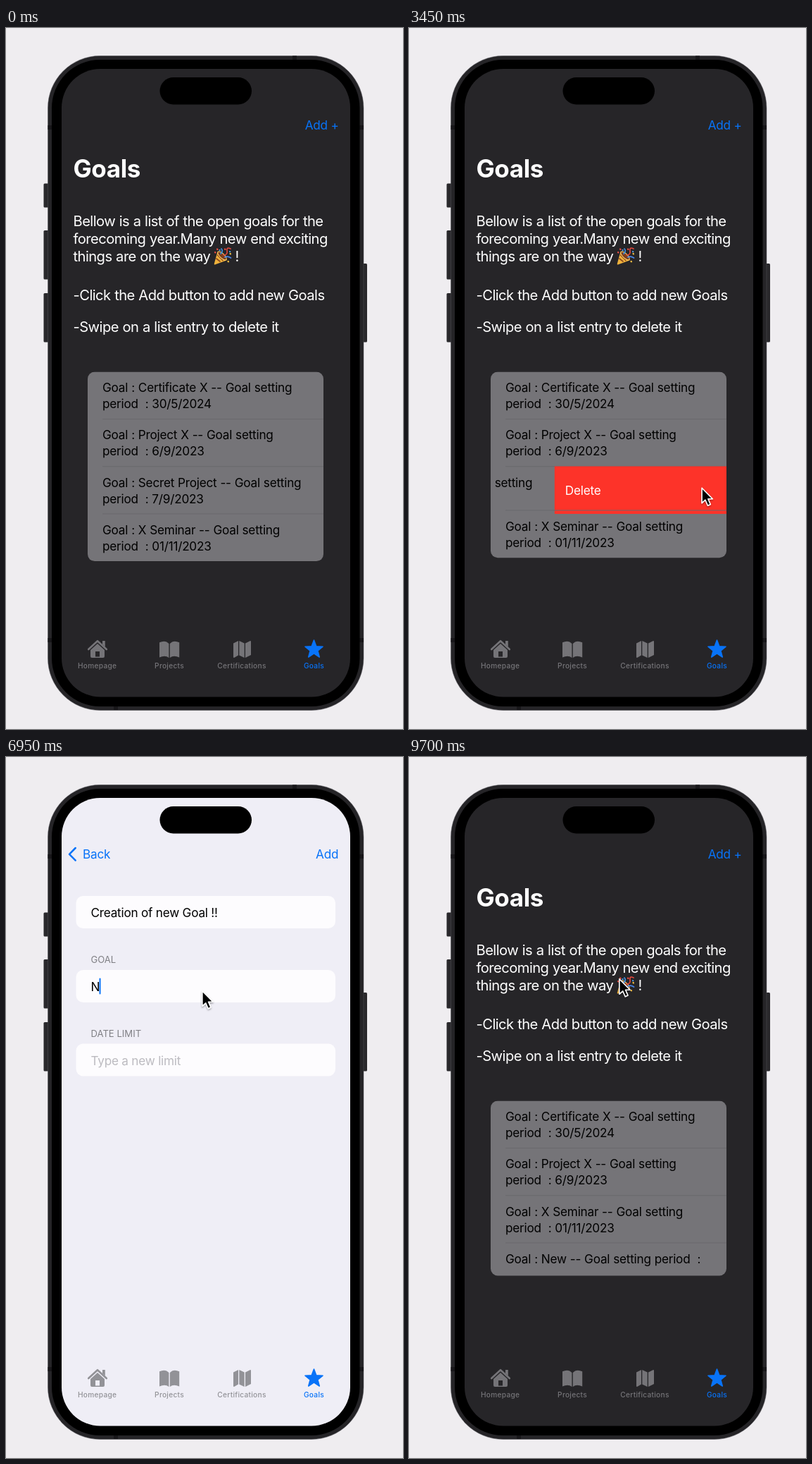
Animation, 564 px wide and 994 px high, one loop 9750 ms. Source, as an HTML page:

```html
<!DOCTYPE html>
<html lang="en">
<head>
<meta charset="utf-8">
<title>Goals app</title>
<style>
  html, body { margin: 0; width: 100%; height: 100%; overflow: hidden; background: #efedf0; }
  svg { display: block; width: 564px; height: 994px; }
  text { font-family: Inter, Roboto, "Liberation Sans", sans-serif; font-optical-sizing: none; }
  .title { font-size: 35px; font-weight: 700; letter-spacing: -.4px; fill: #fff; }
  .intro { font-size: 20.2px; letter-spacing: -.56px; word-spacing: .45px; fill: #fff; }
  .body { font-size: 17.2px; letter-spacing: -.24px; }
  #rows { word-spacing: .38px; }
  .head { font-size: 13.1px; fill: #808085; }
  .tab { font-size: 10.2px; font-weight: 500; letter-spacing: .26px; text-anchor: middle; }
  .blue { fill: #0873f8; }
  .end { text-anchor: end; }
  .hint { fill: #bcbbc0; }
</style>
</head>
<body>
<svg viewBox="0 0 564 994">
  <defs>
    <clipPath id="screen"><rect x="79" y="58" width="410" height="890.5" rx="55"/></clipPath>
    <clipPath id="listClip"><rect id="listBox" x="116" width="335" rx="10"/></clipPath>
    <filter id="shade" x="-50%" y="-50%" width="200%" height="200%">
      <feDropShadow dx="0" dy="1.5" stdDeviation="1.2" flood-opacity=".35"/>
    </filter>
  </defs>
  <rect width="564" height="994" fill="#efedf0"/>

  <g fill="#29282b">
    <rect x="53.5" y="220.5" width="8" height="34" rx="1.5"/>
    <rect x="53.5" y="287" width="8" height="69.5" rx="1.5"/>
    <rect x="53.5" y="376" width="8" height="69.5" rx="1.5"/>
    <rect x="505" y="334" width="8" height="111.5" rx="1.5"/>
  </g>
  <rect x="59.5" y="39.5" width="448.5" height="928" rx="74" fill="#252427" stroke="#55545a" stroke-opacity=".5"/>
  <g fill="#171619">
    <rect x="407" y="39.5" width="6" height="6"/>
    <rect x="153" y="961" width="6" height="6"/>
    <rect x="59.5" y="138" width="6" height="6"/>
    <rect x="502" y="138" width="6" height="6"/>
    <rect x="59.5" y="865" width="6" height="6"/>
    <rect x="502" y="865" width="6" height="6"/>
  </g>
  <rect x="65" y="45" width="437.5" height="917" rx="68.5" fill="#000"/>

  <g clip-path="url(#screen)">
    <g id="goals">
      <rect x="79" y="58" width="535" height="892" fill="#262528"/>
      <text class="title" x="95.5" y="212">Goals</text>
      <g class="intro">
        <text x="95.5" y="281">Bellow is a list of the open goals for the</text>
        <text x="95.5" y="306">forecoming year.Many new end exciting</text>
        <text x="95.5" y="331">things are on the way</text>
        <text x="325.5" y="331">!</text>
        <text x="95.5" y="386">-Click the Add button to add new Goals</text>
        <text x="95.5" y="431">-Swipe on a list entry to delete it</text>
      </g>
      <g fill="none" stroke-width="1.7" stroke-linecap="round">
        <path d="M296.6 334.6L301.3 317.5Q309 320 313 328.6Z" fill="#f0b23c" stroke="#f0b23c" stroke-linejoin="round"/>
        <path d="M299 327L304 331M300.5 322L308 329.5" stroke="#8c4a20"/>
        <ellipse cx="307" cy="323" rx="8" ry="3.2" transform="rotate(43 307 323)" fill="#7a3f20" stroke="#ffd06a" stroke-width="1"/>
        <path d="M305 320Q309 317 306 313" stroke="#3d8fe0"/>
        <path d="M309 322Q315 322 314 316T319 313" stroke="#e3473c"/>
        <path d="M311 325Q315 323 319.5 326" stroke="#4a86e8"/>
        <path d="M300 313.5l.5.5M297 318l.4.4M311 313.5l.4.4" stroke="#e94f45" stroke-width="2.2"/>
        <path d="M318.5 320l.4.4M315.5 331l.5.3" stroke="#f2bf45" stroke-width="2.2"/>
        <path d="M303.5 315l.3.3M318 317l.3.3" stroke="#57a9ef" stroke-width="2"/>
      </g>
      <g id="list">
        <g clip-path="url(#listClip)">
          <rect x="116" width="335" height="340" fill="#757478"/>
          <g id="rows"></g>
        </g>
      </g>
    </g>

    <g id="form">
      <rect x="79" y="58" width="410" height="892" fill="#efeef6"/>
      <g fill="#fdfcfe">
        <rect x="99.5" y="197" width="368.5" height="46" rx="10"/>
        <rect x="99.5" y="302" width="368.5" height="46" rx="10"/>
        <rect x="99.5" y="406.5" width="368.5" height="46" rx="10"/>
      </g>
      <text class="body" x="120.5" y="227">Creation of new Goal !!</text>
      <text class="head" x="120.5" y="292">GOAL</text>
      <text class="head" x="120.5" y="397">DATE LIMIT</text>
      <text class="body hint" id="goalHint" x="120.5" y="331.5">Type a new goal</text>
      <text class="body" id="typed" x="120.5" y="331.5"></text>
      <rect class="blue" id="caret" y="313.5" width="2" height="23" rx="1"/>
      <text class="body hint" x="120.5" y="436.5">Type a new limit</text>
    </g>

    <text class="body blue end" id="addPlus" x="472.6" y="144.3">Add +</text>
    <text class="body blue end" id="addDone" x="472.3" y="144.3">Add</text>
    <g id="back">
      <path d="M98.7 129L90 137.8L98.7 146.6" fill="none" stroke="#0873f8" stroke-width="2.5" stroke-linecap="round" stroke-linejoin="round"/>
      <text class="body blue" id="backText" x="109" y="144">Back</text>
    </g>

    <g id="tabs">
      <path d="M117.2 881L130 869.2L142.8 881" fill="none" stroke="currentColor" stroke-width="2.6" stroke-linecap="round" stroke-linejoin="round"/>
      <path d="M137 869h3.8v8.5l-3.8-3.5Z" fill="currentColor"/>
      <path d="M120 882L130 873L140 882V891Q140 893 138 893H122Q120 893 120 891ZM127 884V891.5H133V884Z" fill="currentColor" fill-rule="evenodd"/>
      <path d="M231.4 873Q226.5 867.4 218 871.2V892.6Q226 888.8 231.4 893ZM232.8 873Q237.7 867.4 246.2 871.2V892.6Q238.2 888.8 232.8 893Z" fill="currentColor"/>
      <path d="M323 872.5L330 869V889.5L324 893Q323 893 323 892ZM331.3 869L338.7 872.5V893L331.3 889.5ZM340 872.5L347 869Q348 869 348 870V889L340 893Z" fill="currentColor"/>
      <polygon id="star" class="blue" stroke="#0873f8" stroke-width="1.6" stroke-linejoin="round"/>
      <g fill="currentColor">
        <text class="tab" x="129.7" y="908.3">Homepage</text>
        <text class="tab" x="232" y="908.3">Projects</text>
        <text class="tab" x="335" y="908.3">Certifications</text>
      </g>
      <text class="tab blue" x="437.5" y="908.3">Goals</text>
    </g>
  </g>
  <rect x="218.5" y="70" width="130.5" height="38.5" rx="19.25" fill="#000"/>

  <g id="cursor" filter="url(#shade)">
    <path d="M.8 .8V22.3L5.7 17.8L9.2 25.8L13 24.1L9.6 16.3H16.1Z" fill="#000" stroke="#fff" stroke-width="1.6" stroke-linejoin="round"/>
  </g>
</svg>
<script>
const LOOP = 9750, STEP = 50;
const LIST_TOP = 487.5, ROW = 67.15, SHORT_ROW = 46.5;
const PUSH = 4950, POP = 8104, SLIDE = 500;
const $ = id => document.getElementById(id);
const clamp = v => Math.max(0, Math.min(1, v));
const smooth = p => p * p * (3 - 2 * p);
const easeOut = p => 1 - (1 - p) ** 3;
const span = (t, from, length) => clamp((t - from) / length);
const shift = (el, x, y = 0) => el.setAttribute("transform", `translate(${x} ${y})`);

// Each key is [time, ...values], eased between neighbours.
function track(keys, t) {
  let i = keys.findIndex(k => k[0] > t);
  if (i < 0) i = keys.length;
  const a = keys[Math.max(0, i - 1)], b = keys[Math.min(i, keys.length - 1)];
  const p = smooth(span(t, a[0], b[0] - a[0] || 1));
  return a.slice(1).map((v, n) => v + (b[n + 1] - v) * p);
}

const pointer = [
  [350, 300, 600], [700, 283, 640], [850, 283, 640], [1216, 287.3, 714],
  [1500, 288, 714], [1900, 335, 651], [2102, 335, 651], [2652, 256, 651],
  [2850, 256, 651], [3150, 415, 655], [3400, 415, 655], [4400, 452, 158],
  [4600, 449, 138], [5400, 449, 138], [6050, 278, 331], [7450, 278, 331],
  [7800, 475, 170], [8000, 449, 136], [8700, 449, 136], [9500, 298, 314]
];
const pull = [[850, 0], [1216, 52], [1300, 52], [1700, 0]];
const swipe = [[2102, 0], [2652, -77], [3300, -77], [3550, -335]];
const typing = [[6900, "N"], [7100, "Ne"], [7250, "New"]];

const rows = [
  ["Goal : Certificate X -- Goal setting", "period  : 30/5/2024"],
  ["Goal : Project X -- Goal setting", "period  : 6/9/2023"],
  ["Goal : Secret Project -- Goal setting", "period  : 7/9/2023"],
  ["Goal : X Seminar -- Goal setting", "period  : 01/11/2023"],
  ["Goal : New -- Goal setting period  :"]
].map((lines, i) => {
  const el = document.createElementNS("http://www.w3.org/2000/svg", "g");
  const text = lines.map((s, n) =>
    `<text class="body" x="137" y="${28.8 + n * 23}">${s.replace("  ", "\u00a0 ")}</text>`).join("");
  const remove = i === 2
    ? `<rect x="451" y="-.3" width="335" height="${ROW + .3}" fill="#fd3329"/><text class="body" x="466" y="40" fill="#fff">Delete</text>`
    : "";
  const rule = i ? `<path d="M137 0H451" stroke="#69686c"/>` : "";
  el.innerHTML = `${rule}<g>${text}${remove}</g>`;
  $("rows").append(el);
  return el;
});

$("star").setAttribute("points", Array.from({ length: 10 }, (_, i) => {
  const r = i % 2 ? 5.6 : 13.2, a = i * Math.PI / 5;
  return `${437.5 + r * Math.sin(a)},${881.3 - r * Math.cos(a)}`;
}).join(" "));

function drawList(t) {
  const [drag] = track(pull, t), [dx] = track(swipe, t);
  const gone = smooth(span(t, 3400, 300));
  const heights = [ROW, ROW, ROW * (1 - gone), ROW, t >= POP ? SHORT_ROW : 0];
  let y = 0;
  heights.forEach((h, i) => {
    shift(rows[i], 0, y);
    rows[i].style.display = h > 0 ? "" : "none";
    y += h;
  });
  shift(rows[2].lastElementChild, dx);
  $("listBox").setAttribute("height", y);
  shift($("list"), 0, LIST_TOP + drag);
}

function drawForm(t) {
  const text = typing.reduce((s, [at, value]) => t >= at ? value : s, "");
  $("typed").textContent = text;
  $("goalHint").style.display = text ? "none" : "";
  $("caret").style.display = t >= 6250 && t < POP ? "" : "none";
  $("caret").setAttribute("x", 120.5 + (text ? $("typed").getComputedTextLength() - .7 : 0));
}

function drawSlide(t) {
  const open = easeOut(span(t, PUSH, SLIDE)) - easeOut(span(t, POP, SLIDE));
  shift($("goals"), -123 * open);
  shift($("form"), 410 * (1 - open));
  $("form").style.display = open > 0 ? "" : "none";
  $("addDone").style.opacity = open;
  $("addPlus").style.opacity = clamp((1 - open) * 2);
  $("back").style.opacity = open;
  shift($("backText"), 30 * (1 - open));
  const grey = [[117, 146], [116, 146], [120, 151]].map(([a, b]) => a + (b - a) * open);
  $("tabs").style.color = `rgb(${grey})`;
}

function frame() {
  const now = performance.now() % LOOP, t = now - now % STEP;
  drawList(t);
  drawForm(t);
  drawSlide(t);
  shift($("cursor"), ...track(pointer, t));
  $("cursor").style.display = t >= pointer[0][0] ? "" : "none";
  requestAnimationFrame(frame);
}
frame();
</script>
</body>
</html>
```
